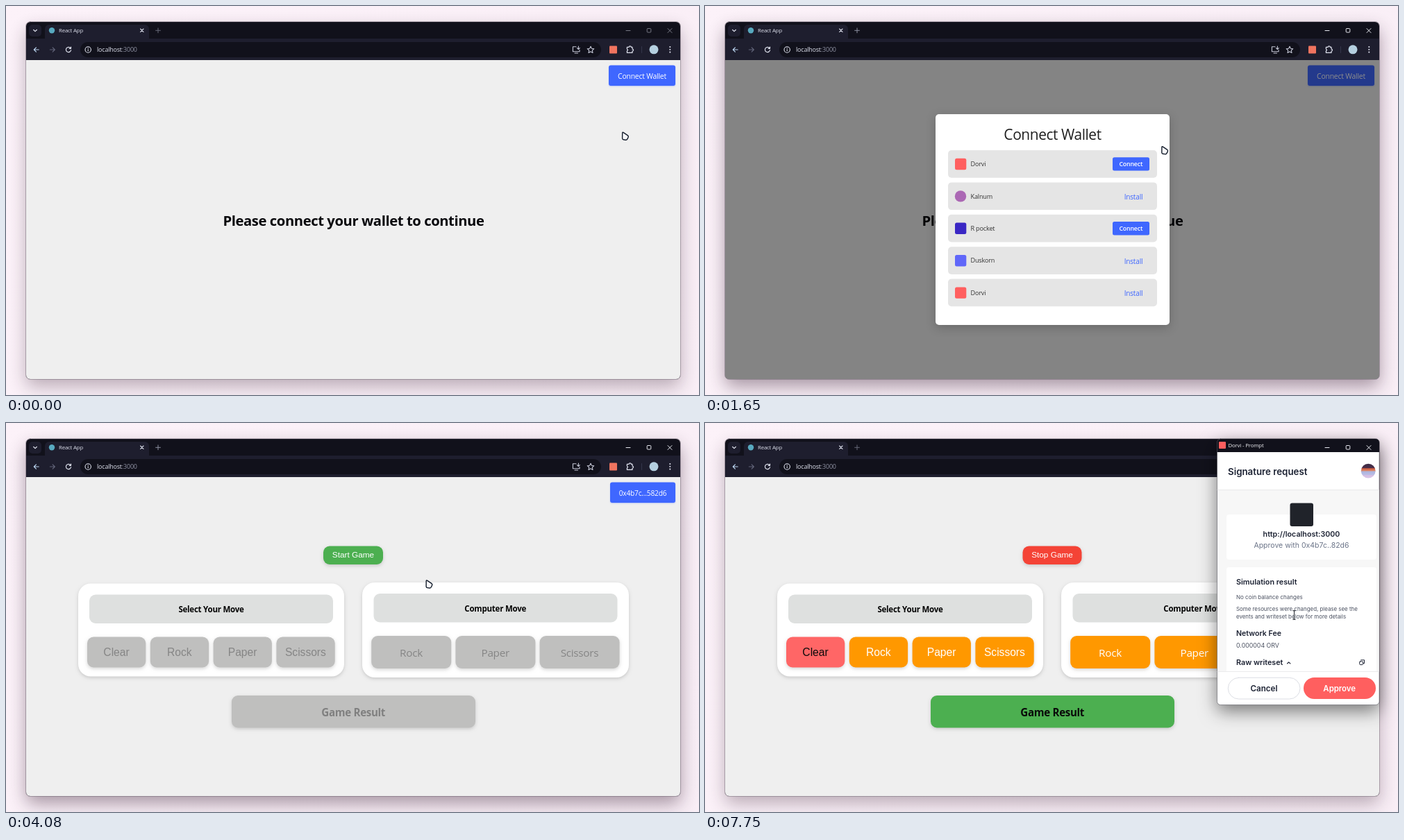
An HTML page with a canvas that plays this animation: 998 px wide and 561 px high, repeating every 8 s.

```html
<!DOCTYPE html>
<html lang="en">
<head>
<meta charset="utf-8">
<title>Wallet game demo</title>
<style>
html, body { margin: 0; width: 100%; height: 100%; overflow: hidden; background: #fbf1f8; }
canvas { display: block; width: 998px; height: 561px; }
</style>
</head>
<body>
<canvas id="stage"></canvas>
<script>
const W = 998, H = 561, LOOP = 8000;
const SANS = '"Open Sans", "Noto Sans", sans-serif';
const ARIAL = '"Liberation Sans", Arial, sans-serif';
const INTER = 'Inter, sans-serif';
const BLUE = '#3f67ff', CORAL = '#ff5f5f', CRUST = '#11111b', BASE = '#1e1e2e', INK = '#1c2233';
const ADDRESS = '0x4b7c...582d6';
const DIALOG = { x: 332, y: 156, w: 337, h: 304, ox: 904, oy: 112 };
const WALLETS = [
  ['Dorvi', '#ff5f5f', true],
  ['Kalnum', '#ab68b4', false],
  ['R pocket', '#3a27c4', true],
  ['Duskorn', '#6067f9', false],
  ['Dorvi', '#ff5f5f', false]
];
const ARROW = new Path2D('M.7 1Q.8-.3 2 .4L8.3 4.6Q10 6 9 7.6L7.6 10.2Q7 11.3 5.6 11.2L2.4 10.8Q.8 10.6.6 9z');
const HAND = new Path2D('M0 8V1.3a1.5 1.5 0 0 1 3 0V5l4 .8q1.6.4 1.5 2l-.6 4q-.4 2-2 2H2.5q-1.2 0-2-1.2L-3 8.6q-.6-1.6 1-1.6z');

const dpr = window.devicePixelRatio || 1;
function makeLayer(canvas, w, h) {
  canvas.width = Math.round(w * dpr);
  canvas.height = Math.round(h * dpr);
  const ctx = canvas.getContext('2d');
  ctx.scale(dpr, dpr);
  return ctx;
}
const stage = makeLayer(document.getElementById('stage'), W, H);
let g = stage;

const clamp = v => Math.min(1, Math.max(0, v));
const mix = (a, b, p) => a + (b - a) * p;
const span = (t, a, b) => clamp((t - a) / (b - a));
const inOut = u => u < .5 ? 4 * u * u * u : 1 - 4 * (1 - u) ** 3;
const inOutCirc = u => u < .5
  ? (1 - Math.sqrt(1 - 4 * u * u)) / 2
  : (Math.sqrt(1 - (2 - 2 * u) ** 2) + 1) / 2;

// Cubic bezier easing, solved by bisection.
function bezier(x1, y1, x2, y2) {
  const at = (u, a, b) => 3 * u * (1 - u) ** 2 * a + 3 * u * u * (1 - u) * b + u ** 3;
  return x => {
    let lo = 0, hi = 1;
    for (let i = 0; i < 24; i++) {
      const mid = (lo + hi) / 2;
      if (at(mid, x1, x2) < x) lo = mid; else hi = mid;
    }
    return at(hi, y1, y2);
  };
}
const outCirc = bezier(.08, .82, .17, 1);

function mixColor(a, b, p) {
  return `rgb(${a.map((v, i) => Math.round(mix(v, b[i], p))).join(',')})`;
}
function shadow(color, blur, dy) {
  g.shadowColor = color;
  g.shadowBlur = blur * dpr;
  g.shadowOffsetY = dy * dpr;
}
const noShadow = () => shadow('transparent', 0, 0);

// Rectangle from edges: left, top, right, bottom.
function box(l, t, r, b, color, radius = 0) {
  g.beginPath();
  g.roundRect(l, t, r - l, b - t, radius);
  g.fillStyle = color;
  g.fill();
}
function frame(l, t, r, b, color, radius, width = 1) {
  g.beginPath();
  g.roundRect(l, t, r - l, b - t, radius);
  g.strokeStyle = color;
  g.lineWidth = width;
  g.stroke();
}
function raised(l, t, r, b, color, radius) {
  shadow('rgba(0,0,0,.16)', 5, 2);
  box(l, t, r, b, color, radius);
  noShadow();
}
function disc(x, y, r, color) {
  g.beginPath();
  g.arc(x, y, r, 0, Math.PI * 2);
  g.fillStyle = color;
  g.fill();
}
function lines(d, color, width = 1.2) {
  g.strokeStyle = color;
  g.lineWidth = width;
  g.lineCap = g.lineJoin = 'round';
  g.stroke(new Path2D(d));
}
// y is the middle of the capital letters.
function text(s, x, y, size, color, { weight = 400, font = SANS, align = 'left' } = {}) {
  g.font = `${weight} ${size}px ${font}`;
  g.letterSpacing = font === SANS ? `${-.02 * size}px` : '0px';
  g.textAlign = align;
  g.fillStyle = color;
  g.fillText(s, x, y + .357 * size);
}
const label = (s, x, y, size, color, weight, font) =>
  text(s, x, y, size, color, { weight, font, align: 'center' });

function windowButtons(color) {
  lines('M893 35.5h6', color, 1);
  frame(923.2, 32.5, 928.8, 38, color, 1);
  lines('M953 32.5l6 6m0-6l-6 6', color, 1);
}

function browser(active) {
  const bg = g.createLinearGradient(0, 0, W, H);
  bg.addColorStop(0, '#fcf2f9');
  bg.addColorStop(1, '#f9eef6');
  g.fillStyle = bg;
  g.fillRect(0, 0, W, H);
  shadow(`rgba(50,25,45,${active ? .42 : .32})`, 26, 11);
  box(29, 23, 971, 538, CRUST, 6);
  noShadow();
  frame(28.7, 22.7, 971.3, 538.3, 'rgba(70,60,75,.55)', 6, .8);

  box(33, 27, 51, 44, BASE, 5);
  lines('M39.6 34.3l2.4 2.3 2.4-2.3', '#dfe2ee');
  box(56, 27, 206, 48, BASE, [6, 6, 0, 0]);
  disc(66, 35.3, 4.2, '#58a9bf');
  text('React App', 76, 35.6, 7.8, '#dfe2ee');
  lines('M193.6 33l4.4 4.4m0-4.4l-4.4 4.4', '#dfe2ee', 1.1);
  lines('M215.6 35.3h6.8m-3.4-3.4v6.8', active ? '#8d90a0' : '#666978', 1);
  windowButtons(active ? '#e8e9f0' : '#777985');

  box(29, 47, 971, 78, BASE);
  lines('M47.2 63h-6.8m3-3.1l-3.1 3.1 3.1 3.1', '#b9d3ee');
  lines('M63.4 63h6.8m-3-3.1l3.1 3.1-3.1 3.1', '#62657a');
  lines('M93 60.9a3.6 3.6 0 1 0 .6 2.6M93.5 59v2.3h-2.4', '#dfe2ee');
  box(107, 52, 857, 74, CRUST, 11);
  lines('M122.4 63a4.2 4.2 0 1 0-8.4 0a4.2 4.2 0 1 0 8.4 0M118.2 62.8v2', '#dfe2ee', 1.1);
  disc(118.2, 60.9, .7, '#dfe2ee');
  text('localhost', 131, 63.2, 8.95, '#dfe2ee');
  text(':3000', 131 + g.measureText('localhost').width, 63.2, 8.95, '#8f92a3');
  lines('M821 58.8h-4.6v7h9.6v-2.2M819 68h4.5M824.4 58v4.4m-1.9-1.8l1.9 1.9 1.9-1.9', '#c5c8d6', 1.1);
  lines('M842 58.2l1.4 3.1 3.4.4-2.5 2.3.7 3.4-3-1.7-3 1.7.7-3.4-2.5-2.3 3.4-.4z', '#c5c8d6', 1.1);
  box(869, 57.5, 880, 68.5, '#f0745f', 1);
  lines('M894.4 59.3h2.8a1.5 1.5 0 0 1 3 0h1.8v2.8a1.5 1.5 0 0 1 0 3v2.3h-7.6v-2.5a1.5 1.5 0 0 0 0-2.8z', '#dfe2ee', 1.2);
  lines('M915.5 58.5v9', '#34354a', 1);
  disc(933, 62.8, 6.5, '#b5d0e0');
  for (const y of [59, 62.8, 66.6]) disc(956.3, y, 1.05, '#dfe2ee');

  box(29, 78, 971, 538, '#efefef', [0, 0, 6, 6]);
}

function connectPage(hover) {
  shadow('rgba(63,103,255,.3)', 2, 1);
  box(868, 85.5, 964, 115, mixColor([63, 103, 255], [231, 238, 255], hover), 3);
  noShadow();
  if (hover > 0) frame(867.5, 85, 964.5, 115.5, `rgba(64,116,224,${hover})`, 3, 1.5);
  label('Connect Wallet', 916, 101, 10.4, mixColor([255, 255, 255], [63, 103, 224], hover));
  label('Please connect your wallet to continue', 500.5, 309.8, 20.2, '#08080c', 700);
}

function drawDialog() {
  box(332, 156, 669, 460, '#fff', 5);
  label('Connect Wallet', 500.5, 185.5, 20.9, '#1f1f1f', 500);
  WALLETS.forEach(([name, color, ready], i) => {
    const y = 228 + i * 46.4;
    box(350, y - 20, 651, y + 19.7, '#e5e5e5', 5);
    if (i === 1) disc(368, y, 8.2, color);
    else box(360, y - 8.2, 376.3, y + 8.2, color, 2.5);
    text(name, 382.5, y, 9.1, '#333');
    if (ready) {
      box(587, y - 9.8, 640, y + 9.6, BLUE, 2.5);
      label('Connect', 613.3, y, 8.8, '#fff', 600);
    } else {
      label('Install', 617, y + .8, 10.1, BLUE);
    }
  });
}
const dialogCanvas = document.createElement('canvas');
g = makeLayer(dialogCanvas, DIALOG.w, DIALOG.h);
g.translate(-DIALOG.x, -DIALOG.y);
drawDialog();
g = stage;

function modal(t) {
  if (t < 920 || t >= 2530) return;
  const since = Math.floor((t - 920) / 66) * 66;
  const closing = span(t, 2330, 2530);
  const veil = closing ? 1 - closing : clamp((since + 48) / 200);
  const zoom = closing ? 1 - inOutCirc(closing) : outCirc(clamp((since + 22) / 200));
  box(29, 78, 971, 538, `rgba(0,0,0,${.45 * veil})`, [0, 0, 6, 6]);
  g.save();
  g.beginPath();
  g.rect(29, 78, 942, 460);
  g.clip();
  const s = .2 + .8 * zoom, { x, y, w, h, ox, oy } = DIALOG;
  g.globalAlpha = zoom;
  shadow('rgba(0,0,0,.2)', 14, 4);
  g.drawImage(dialogCanvas, ox + (x - ox) * s, oy + (y - oy) * s, w * s, h * s);
  g.restore();
}

function gamePage(running, hover) {
  shadow('rgba(63,103,255,.3)', 2, 1);
  box(870, 85.5, 964, 115, BLUE, 3);
  noShadow();
  label(ADDRESS, 917, 101, 10.2, '#fff');

  g.globalAlpha = hover ? .8 : 1;
  if (running) raised(457.5, 177.5, 542.5, 204, '#f44336', 9);
  else raised(457, 177.5, 543, 204, '#4caf50', 9);
  g.globalAlpha = 1;
  label(running ? 'Stop Game' : 'Start Game', 500, 190.2, 11.8, '#fff', 400, ARIAL);

  raised(104, 231.5, 487, 365.5, '#fff', 18);
  raised(513, 230, 897, 367, '#fff', 18);
  box(120, 247.5, 471, 289, '#dee0df', 9);
  box(529.5, 246, 880.5, 287.5, '#dee0df', 9);
  label('Select Your Move', 295.5, 268.6, 11.5, '#050505', 700);
  label('Computer Move', 704.7, 267.4, 11.5, '#050505', 700);

  const fill = running ? '#ff9800' : '#bfbfbe', ink = running ? '#fff' : '#858585';
  ['Clear', 'Rock', 'Paper', 'Scissors'].forEach((name, i) => {
    const x = 117 + i * 90.8, clear = running && i === 0;
    raised(x, 308.5, x + 84.3, 352.5, clear ? '#ff6666' : fill, 9);
    label(name, x + 42, 330.4, 15.6, clear ? '#0a0a0a' : ink, 400, ARIAL);
  });
  ['Rock', 'Paper', 'Scissors'].forEach((name, i) => {
    const x = 526.2 + i * 121.2;
    raised(x, 307, x + 115, 354, fill, 9);
    label(name, x + 57.3, 332, 15.3, ink);
  });
  raised(325, 393, 676, 439.5, running ? '#4caf50' : '#bfbfbe', 9);
  label('Game Result', 500.2, 417.5, 15.1, running ? '#0a0a0a' : '#808080', 700);
}

function avatar() {
  const sky = g.createLinearGradient(0, 58.5, 0, 79.5);
  [[0, '#3b2a45'], [.3, '#4a2e48'], [.34, '#c8573c'], [.5, '#e08a6a'],
    [.54, '#a9b4dd'], [.78, '#bcbde6'], [.82, '#d9bfe2'], [1, '#d3c3ea']]
    .forEach(([at, color]) => sky.addColorStop(at, color));
  disc(955.2, 69.2, 10.4, sky);
}

function prompt(t) {
  const open = inOut(span(t, 6180, 6400));
  if (!open) return;
  const bold = { weight: 600, font: INTER }, plain = { font: INTER };
  const s = mix(.92, 1, open);
  g.save();
  g.globalAlpha = open;
  g.translate(854, 215);
  g.scale(s, s);
  g.translate(-854, -215);
  shadow('rgba(0,0,0,.5)', 26, 9);
  box(737.5, 23, 971, 406.5, '#fff', 5);
  noShadow();
  frame(737.5, 23, 971, 406.5, 'rgba(60,60,70,.6)', 5, .8);
  box(737.5, 23, 971, 42, CRUST, [5, 5, 0, 0]);
  box(740, 27, 750, 37, CORAL, 1);
  text('Dorvi - Prompt', 753.5, 32.6, 7.8, '#f0f0f4');
  windowButtons('#e8e9f0');
  box(738, 96, 970.6, 358, '#f7f7f7');
  lines('M738 96.5H970.6M738 358.5H970.6', '#e6e6e8', .8);

  if (t >= 6630) {
    text('Signature request', 753, 69.8, 13.3, INK, bold);
    box(751, 132, 967, 197, '#fff', 4);
    box(842.5, 115.5, 876, 149, '#20232a', 3);
    label('http://localhost:3000', 859, 160.3, 10.7, INK, 600, INTER);
    label('Approve with 0x4b7c..82d6', 859, 176, 10.5, '#6b7488', 400, INTER);
    box(751, 208, 967, 358, '#fff', [4, 4, 0, 0]);
    frame(753.3, 367.3, 857, 398, '#dcdee4', 15.4);
    label('Cancel', 805, 382.8, 11.6, INK, 600, INTER);
    const ready = span(t, 7490, 7620);
    box(862, 367, 966, 398, mixColor([255, 175, 175], [255, 95, 95], ready), 15.5);
    label('Approve', 913.7, 382.8, 11.4, '#fff', 600, INTER);
  }
  if (t >= 6400) avatar();
  if (t >= 7490) {
    text('Simulation result', 765, 229.3, 10.8, INK, bold);
    text('No coin balance changes', 765, 251, 8, '#4a5060', plain);
    text('Some resources were changed, please see the', 765, 267.8, 7.9, '#4a5060', plain);
    text('events and writeset below for more details', 765, 279.3, 7.9, '#4a5060', plain);
    text('Network Fee', 765, 303.2, 10.6, INK, bold);
    text('0.000004 ORV', 765, 320.8, 8.8, '#4a5060', plain);
    text('Raw writeset', 765, 345, 10.8, INK, bold);
    lines('M838.5 347l2.2-2.2 2.2 2.2', INK, 1.1);
    frame(942.7, 343.8, 947.5, 348.6, INK, 1);
    lines('M944.6 341.8h4.9v4.9h-1.6', INK, 1);
  }
  g.restore();
}

// Each move: start, end, from, to, sideways bend of y.
const MOVES = [
  [40, 870, [887, 182], [899.5, 111.5], 0],
  [1100, 1954, [899.5, 111.5], [604.5, 226.8], -7],
  [4520, 5360, [604.5, 226.8], [502, 203], 0],
  [6480, 7480, [502, 203], [848.5, 277], 0]
];
function cursorAt(t) {
  const [a, b, from, to, bend] = MOVES.filter(m => t >= m[0]).pop() || MOVES[0];
  const p = inOut(span(t, a, b));
  return [mix(from[0], to[0], p), mix(from[1], to[1], p) + bend * Math.sin(Math.PI * p)];
}

function cursor(t) {
  const [x, y] = cursorAt(t);
  g.save();
  g.translate(x, y);
  if (t >= 7490) {
    lines('M-1.8-6.3H1.8M0-6.3V6.3M-1.8 6.3H1.8', '#20242c', 1);
  } else {
    const hand = t >= 1860 && t < 2480 || t >= 5420 && t < 6650;
    const shape = hand ? HAND : ARROW;
    g.fillStyle = '#f8f8fa';
    g.fill(shape);
    g.strokeStyle = '#141d2c';
    g.lineWidth = 1.4;
    g.lineJoin = 'round';
    g.stroke(shape);
  }
  g.restore();
}

function draw(t) {
  const active = t >= 800 && t < 6200;
  browser(active);
  if (t < 4080) {
    connectPage(span(t, 720, 880) * (1 - span(t, 1000, 1250)));
    modal(t);
  } else {
    gamePage(t >= 5820, t >= 5420 && t < 6650);
  }
  prompt(t);
  cursor(t);
}

const start = performance.now();
function tick() {
  draw((performance.now() - start) % LOOP);
  requestAnimationFrame(tick);
}
tick();
</script>
</body>
</html>
```
